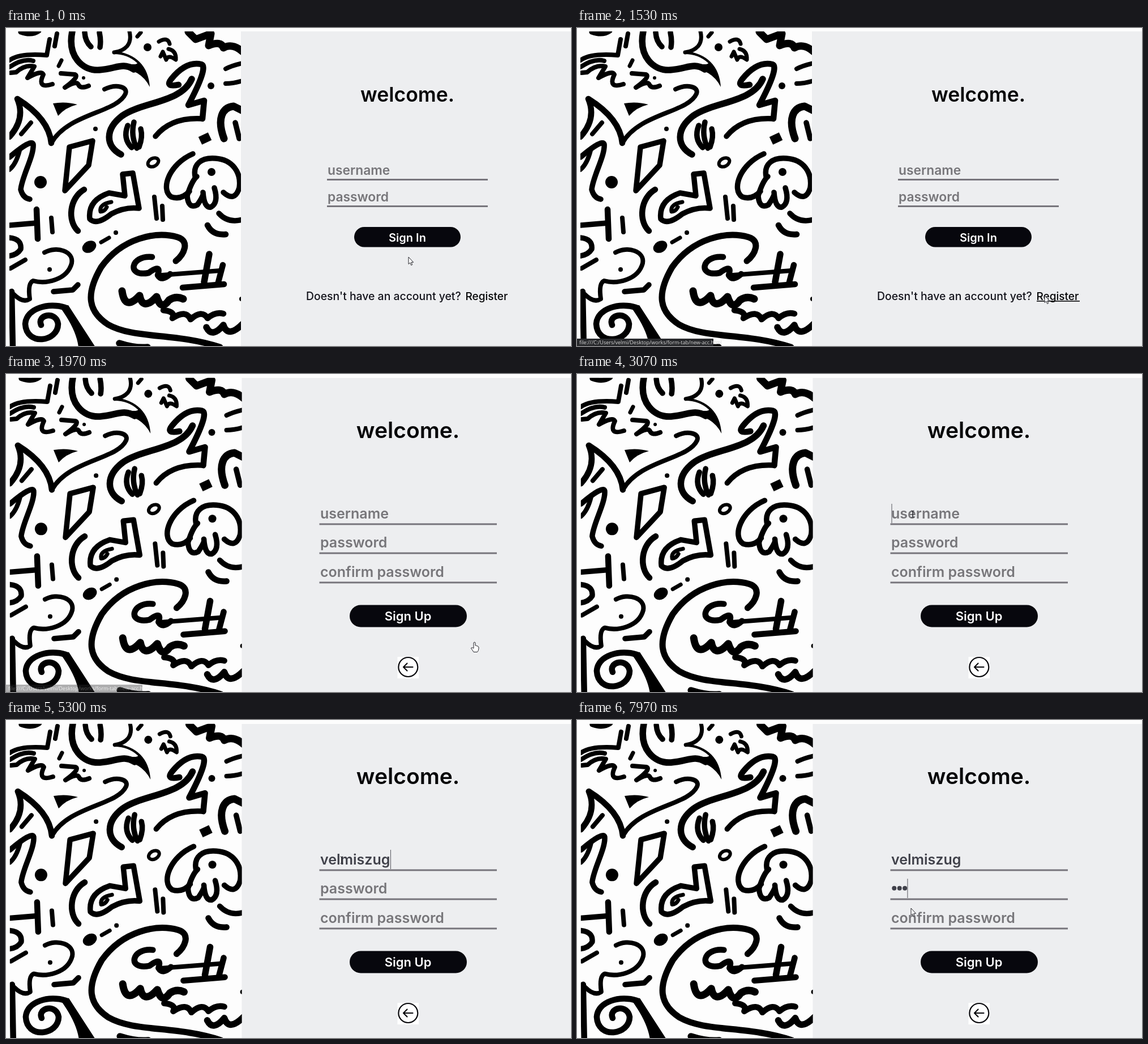
Animation of 998 by 561 pixels, one loop 8000 ms. Source, as an HTML page:

```html
<!DOCTYPE html>
<html lang="en">
<head>
<meta charset="utf-8">
<title>Sign in</title>
<style>
html, body { margin: 0; width: 100%; height: 100%; overflow: hidden; background: #fdfdfd; }
svg { display: block; width: 100vw; height: 100vh; }
text { font-family: Inter, sans-serif; font-weight: 600; }
.title { fill: #050507; text-anchor: middle; }
.hint { fill: #77767a; }
.value { fill: #40414a; }
.label { fill: #fbfbfd; text-anchor: middle; }
.rule { fill: #77757c; }
.button { fill: #07070d; }
.note { font-size: 19.4px; font-weight: 500; fill: #14141c; }
.status text { font: 9px "Open Sans", sans-serif; fill: #d6d6d6; }
#art { fill: none; stroke: #000; stroke-linecap: round; stroke-linejoin: round; }
#art .solid { fill: #000; stroke: none; }
.cursor { fill: #fff; stroke: #25252b; stroke-width: 1; stroke-linejoin: round; }
</style>
</head>
<body>
<svg viewBox="0 0 998 561" preserveAspectRatio="none">
  <defs><clipPath id="frame"><rect x="6" y="6" width="409" height="560"/></clipPath></defs>
  <rect width="998" height="561" fill="#fdfdfd"/>
  <rect id="panel" x="415" y="6" width="583" height="555" fill="#edeef0"/>

  <g id="artBox"><g clip-path="url(#frame)"><g id="art">
    <g stroke-width="7">
      <path d="M218 6Q222 22 214 32Q206 41 191 43"/>
      <path d="M232 15L238 8M93 67L98 57"/>
      <path d="M270 24Q286 15 289 28M273 50L277 42L283 56Q286 46 300 56Q301 40 287 37"/>
      <path d="M186 307Q164 311 167 324Q174 324 178 316"/>
      <ellipse cx="260" cy="237" rx="10" ry="7" transform="rotate(-30 260 237)" stroke-width="6"/>
    </g>
    <g stroke-width="8">
      <path d="M6 57Q24 44 72 48L77 20M90 10L86 32"/>
      <path d="M6 69Q30 53 48 58M8 79L18 78Q34 64 50 68L38 88Q62 74 66 82Q54 108 82 99"/>
      <path d="M97 80L122 82Q130 86 104 105Q125 92 128 100T146 102"/>
      <path d="M388 72Q400 66 418 62M388 98Q402 98 418 93"/>
      <path d="M174 108C195 98 216 104 211 116C196 150 110 150 80 203"/>
      <path d="M44 167L27 187M6 250Q18 240 24 216"/>
      <path d="M262 298L266 336M276 314L277 338M80 335L82 360"/>
      <path d="M168 378L182 370" stroke-width="7"/>
      <path d="M8 424L34 409"/>
      <path d="M68 396C90 384 120 394 116 415C108 445 70 452 48 446Q38 450 42 478Q30 486 14 470"/>
      <path d="M275 436L378 428"/>
    </g>
    <g stroke-width="9.500">
      <path d="M139 8Q140 24 150 33M165 8Q168 22 166 34"/>
      <path d="M264 191C285 165 315 158 347 160"/>
      <path d="M215 172Q206 195 222 211M226 166Q220 190 231 212M238 178Q242 192 235 210"/>
      <path d="M6 228Q45 195 48 205C50 225 28 262 26 285Q30 300 42 302"/>
      <path d="M112 210L153 199L146 242L104 287Z"/>
      <path d="M206 258L224 256L235 318Q210 315 186 328Q160 349 148 337Q144 304 182 291L210 296Z"/>
      <path d="M330 222C288 240 272 285 292 298Q310 304 324 288"/>
      <path d="M334 262C330 240 345 228 370 230C400 232 416 255 412 282Q404 308 384 290"/>
      <path d="M337 262Q328 270 320 296Q322 320 338 312Q350 295 348 290Q350 318 362 316Q376 308 368 282"/>
      <path d="M405 167L412 195M376 327Q392 345 418 338"/>
      <path d="M6 348L54 344M6 370Q28 372 26 390Q20 400 6 402"/>
      <path d="M84 465L118 462L127 453"/>
    </g>
    <g stroke-width="10.500">
      <path d="M305 100Q280 105 292 90Q318 58 345 64Q358 68 322 136L350 128L347 160"/>
      <path d="M80 203Q76 160 20 125Q35 160 6 192"/>
      <path d="M138 285C112 300 108 340 127 358"/>
      <path d="M356 348Q365 366 388 364M54 320L56 372"/>
      <path d="M10 465L12 565"/>
      <path d="M62 524C54 506 88 498 92 522C92 554 36 562 34 522C36 494 76 484 104 493"/>
      <path d="M258 404C220 400 212 440 252 432Q275 415 268 436Q275 448 290 434"/>
      <path d="M312 458L385 452M383 418L374 452"/>
      <path d="M278 498Q300 500 294 512Q318 496 326 514Q346 496 356 512Q370 500 384 504"/>
    </g>
    <g stroke-width="11.500">
      <path d="M117 6C108 50 135 76 165 74S205 60 226 73"/>
      <path d="M328 90C310 132 240 130 205 155C175 178 175 208 203 223"/>
      <path d="M300 411C314 400 326 376 303 369C265 358 205 370 168 422C140 470 145 500 180 523C225 549 300 537 378 563" stroke-width="11"/>
      <path d="M359 399L350 448M354 528Q364 548 384 524Q392 548 418 522"/>
      <path d="M200 556Q228 565 250 563"/>
    </g>
    <g stroke-width="13">
      <path d="M322 7L335 20L362 10L358 31Q380 22 384 35Q400 26 418 42"/>
      <path d="M205 464Q210 500 236 472Q242 500 266 474Q274 500 288 480Q300 472 313 478"/>
      <path d="M385 195C372 160 382 140 402 138L418 146"/>
      <path d="M26 7Q45 14 58 5" stroke-width="9"/>
      <path d="M343 199L360 191" stroke-width="15" stroke-linecap="butt"/>
    </g>
    <g class="solid">
      <path d="M190 40Q250 48 254 104Q238 72 196 70L210 62Q230 66 232 62Q215 46 190 46Z"/>
      <path d="M83 133Q105 129 126 135Q105 140 92 155Z"/>
      <path d="M92 488L110 489L158 563L128 563Q124 530 92 488Z"/>
      <circle cx="137" cy="88" r="3"/><circle cx="250" cy="34" r="7"/>
      <circle cx="362" cy="102" r="6"/><circle cx="158" cy="178" r="4"/>
      <circle cx="61" cy="272" r="11"/><circle cx="363" cy="254" r="7"/>
      <circle cx="194" cy="361" r="4"/><circle cx="77" cy="426" r="4"/>
      <circle cx="416" cy="478" r="4"/>
      <ellipse cx="147" cy="386" rx="13" ry="10" transform="rotate(-30 147 386)"/>
    </g>
  </g></g></g>

  <g id="signIn">
    <text class="title" x="709" y="130" font-size="35.5">welcome.</text>
    <g font-size="22.8">
      <text class="hint" x="568" y="259">username</text>
      <text class="hint" x="568" y="306">password</text>
    </g>
    <rect class="rule" x="567" y="266" width="284" height="3"/>
    <rect class="rule" x="567" y="313" width="284" height="3"/>
    <rect class="button" x="615" y="351" width="188" height="35.5" rx="17.7"/>
    <text class="label" x="709" y="376.5" font-size="20">Sign In</text>
    <text class="note" x="530" y="480">Doesn't have an account yet?</text>
    <text class="note" x="811.5" y="480" style="font-size:19px;fill:#050507">Register</text>
    <rect id="underline" x="812" y="481" width="76" height="1.6" fill="#050507"/>
  </g>

  <g id="signUp">
    <text class="title" x="710" y="112.5" font-size="39">welcome.</text>
    <g font-size="25">
      <text class="hint" id="userHint" x="555" y="255">username</text>
      <text class="value" id="userValue" x="555" y="255"></text>
      <text class="hint" id="passHint" x="555" y="306">password</text>
      <text class="hint" x="555" y="357.5">confirm password</text>
    </g>
    <g class="value" id="dots">
      <circle cx="560.3" cy="296.7" r="4"/><circle cx="569.7" cy="296.7" r="4"/><circle cx="579.1" cy="296.7" r="4"/>
    </g>
    <rect class="rule" x="553.5" y="263.4" width="313.5" height="3"/>
    <rect class="rule" x="553.5" y="314.6" width="313.5" height="3"/>
    <rect class="rule" x="553.5" y="366.4" width="313.5" height="3"/>
    <rect class="button" x="607" y="407.5" width="207" height="39" rx="19.5"/>
    <text class="label" x="710" y="435.3" font-size="22">Sign Up</text>
    <rect x="691.5" y="499" width="37.5" height="38" fill="#fff"/>
    <g fill="none" stroke="#08080c" stroke-width="2.2" stroke-linecap="round" stroke-linejoin="round">
      <circle cx="710.3" cy="517" r="17"/>
      <path d="M718.500 517H702.500M708.500 510.500L702 517L708.500 523.500"/>
    </g>
    <rect id="caret" width="1" height="34" fill="#55555c"/>
  </g>

  <g class="status" id="status">
    <rect y="548" width="241" height="13" fill="#292a2d"/>
    <text x="4" y="558">file:///C:/Users/velmi/Desktop/works/form-tab/new-acc.html</text>
  </g>

  <g class="cursor" id="cursor">
    <path id="arrow" d="M0 0V12.500L2.800 10L4.700 14.500L6.700 13.600L4.800 9.300H8.600Z"/>
    <path id="hand" d="M-2-8Q0-10 1-8V-3Q3-4 3.500-2Q5.500-3 6-1Q7.500-1 7 2Q7 6 4.500 8.500H-2Q-4 5-6.500 2Q-6-0.500-2 2Z"/>
    <path id="beam" fill="none" d="M-2.500-6Q0-6 0-5V5Q0 6-2.500 6M2.500-6Q0-6 0-5V5Q0 6 2.500 6"/>
  </g>
</svg>
<script>
const LOOP = 8000, PAGE_TURN = 1570;
const USER = 'velmiszug';
const userKeys = [3800, 3930, 4050, 4170, 4400, 4600, 4870, 5000, 5130];
const passKeys = [7100, 7330, 7530];
const userFocus = 3000, passFocus = 6580;

// [time, x, y]
const track = [
  [30, 711, 404], [400, 760, 432], [830, 834, 476], [870, 834, 476], [1300, 826, 472],
  [1570, 826, 472], [1600, 828, 482], [2000, 828, 482], [2350, 740, 390], [2700, 610, 262],
  [2950, 593, 247], [6000, 593, 247], [6370, 592, 288], [7830, 592, 288], [7960, 590, 332]
];
const kinds = [
  [0, 'arrow'], [700, 'hand'], [1530, 'arrow'], [1570, 'hand'],
  [2030, 'arrow'], [2600, 'beam'], [7880, 'arrow']
];

const $ = id => document.getElementById(id);
const show = (id, on) => { $(id).style.display = on ? '' : 'none'; };
const countUntil = (times, t) => times.filter(k => k <= t).length;
const clamp = v => Math.max(0, Math.min(1, v));

function pointAt(t) {
  const i = track.findIndex(p => p[0] > t);
  if (i === 0) return track[0].slice(1);
  if (i < 0) return track[track.length - 1].slice(1);
  const [t0, x0, y0] = track[i - 1], [t1, x1, y1] = track[i];
  const k = (t - t0) / (t1 - t0);
  return [x0 + (x1 - x0) * k, y0 + (y1 - y0) * k];
}

function drawCursor(t) {
  const [x, y] = pointAt(t);
  $('cursor').setAttribute('transform', `translate(${x} ${y})`);
  const kind = kinds.filter(k => k[0] <= t).pop()[1];
  for (const id of ['arrow', 'hand', 'beam']) show(id, id === kind);
}

function drawFields(t) {
  const letters = countUntil(userKeys, t), dots = countUntil(passKeys, t);
  const value = $('userValue');
  value.textContent = USER.slice(0, letters);
  show('userHint', !letters);
  show('passHint', !dots);
  [...$('dots').children].forEach((dot, i) => { dot.style.display = i < dots ? '' : 'none'; });

  // The blink restarts at every click or key.
  const lastInput = [userFocus, ...userKeys, passFocus, ...passKeys].filter(k => k <= t).pop();
  show('caret', lastInput !== undefined && (t - lastInput) % 1000 < 500);
  const inPass = t >= passFocus;
  const typed = inPass ? dots * 9.3 : letters ? value.getComputedTextLength() : 0;
  $('caret').setAttribute('x', 555.5 + typed);
  $('caret').setAttribute('y', inPass ? 280 : 229);
}

function draw(t) {
  const second = t >= PAGE_TURN;
  show('signIn', !second);
  show('signUp', second);
  $('artBox').setAttribute('transform', second ? 'translate(.8 .8) scale(1.002)' : '');
  $('panel').setAttribute('x', second ? 416.5 : 415);
  $('panel').setAttribute('y', second ? 7 : 6);
  show('underline', t >= 700);
  $('status').style.opacity = clamp((t - 730) / 100) * clamp((2030 - t) / 160);
  if (second) drawFields(t);
  drawCursor(t);
}

const start = performance.now();
function tick() {
  draw((performance.now() - start) % LOOP);
  requestAnimationFrame(tick);
}
tick();
</script>
</body>
</html>
```
